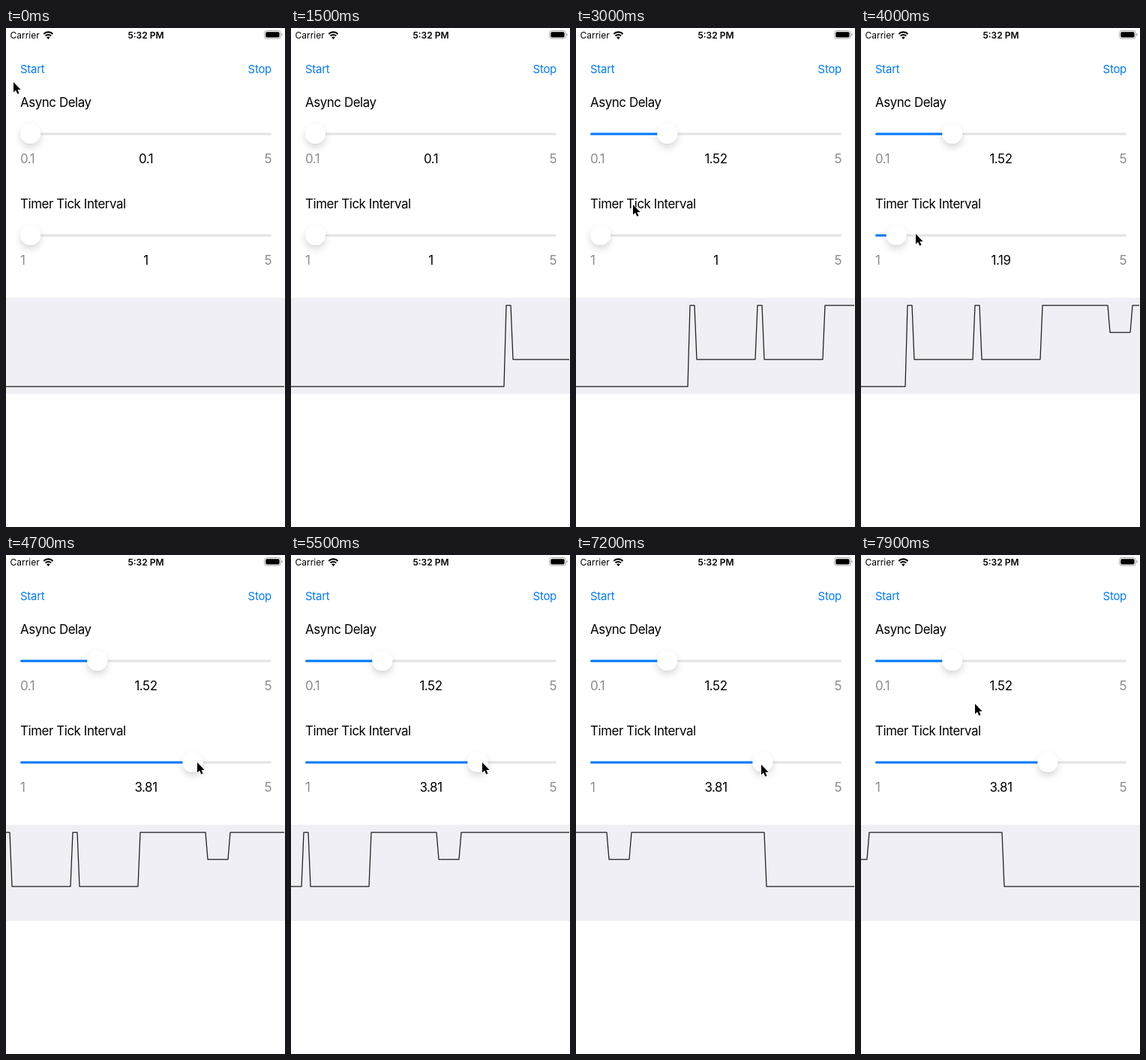
Recreate the animation shown at these times as an HTML page. Size 372 by 664 pixels, loop 8 s.

```html
<!DOCTYPE html>
<html lang="en">
<head>
<meta charset="utf-8">
<title>Async timer demo</title>
<style>
  html, body { margin: 0; width: 100%; height: 100%; overflow: hidden; background: #fff; }
  svg { display: block; width: 372px; height: 664px; font-family: Inter, "Liberation Sans", sans-serif; }
  .status { font-size: 12px; }
  .label { font-size: 16.9px; letter-spacing: -.42px; }
  .button { font-size: 14.9px; letter-spacing: -.22px; fill: #007aff; }
  .limit { fill: #8a8a8e; }
  .mid { text-anchor: middle; }
  .end { text-anchor: end; }
</style>
</head>
<body>
<svg viewBox="0 0 372 664">
  <defs>
    <clipPath id="plot"><rect y="359" width="371" height="128"/></clipPath>
    <filter id="shadow" x="-100%" y="-100%" width="300%" height="300%">
      <feDropShadow dx="0" dy="0.4" stdDeviation="0.5" flood-opacity=".1"/>
      <feDropShadow dx="0" dy="5" stdDeviation="5" flood-opacity=".15"/>
    </filter>
  </defs>

  <text class="status" x="5.5" y="14">Carrier</text>
  <g fill="none" stroke="#000" stroke-width="2.1">
    <path d="M50.3 7.9A8.6 8.6 0 0 1 62.5 7.9"/>
    <path d="M52.6 10.5A5.4 5.4 0 0 1 60.2 10.5"/>
  </g>
  <path d="M56.4 15L54.1 12.6A3.2 3.2 0 0 1 58.7 12.6Z"/>
  <text class="status mid" x="186.5" y="14" font-weight="600">5:32 PM</text>
  <rect x="344.6" y="3.6" width="21.6" height="10.4" rx="3" fill="none" stroke="#a6a6a6"/>
  <rect x="346.2" y="5.2" width="18.4" height="7.2" rx="1.7"/>
  <path d="M367.4 7.1Q368.9 7.5 368.9 8.8T367.4 10.5Z" fill="#a6a6a6"/>

  <text class="button" id="start" x="19" y="60">Start</text>
  <text class="button end" x="354" y="60">Stop</text>

  <g id="sliders"></g>

  <rect y="359" width="372" height="128" fill="#f0eff5"/>
  <g clip-path="url(#plot)">
    <polyline id="signal" fill="none" stroke="#1c1c1e" stroke-width="1.25" stroke-linejoin="round"/>
  </g>
  <path id="cursor" d="M0 0V13.6L3.1 10.8L5.3 15.7L7.5 14.7L5.4 10H9.6Z" stroke="#fff" stroke-width="1.3" paint-order="stroke"/>
</svg>
<script>
const LOOP = 8000, STEP = 100, SCROLL = 0.09;
const TRACK = { left: 19, right: 354, min: 32.5, span: 308 };
const LOW = 477, IDLE = 441, PENDING = 405, HIGH = 369, EDGE = 3;
const byId = id => document.getElementById(id);

// Each key is [time, ...values].
const cursorKeys = [
  [0, 10, 72], [400, 27, 51], [1700, 27, 51], [1800, 9, 138], [2000, 38, 141],
  [2100, 45, 141], [2500, 127, 141], [2700, 127, 142], [3000, 76, 235],
  [3400, 38.5, 276], [3800, 38.5, 275], [3900, 53, 274], [4000, 73, 274],
  [4400, 255, 276], [5500, 255, 276], [5800, 247, 279], [7200, 247, 279], [7800, 152, 198]
];
const delayKeys = [[2100, .1], [2600, 1.52]];
const intervalKeys = [[3800, 1], [4000, 1.19], [4100, 1.45], [4500, 3.81]];

// Level changes, by distance along the scrolling trace.
const levels = [
  [419, HIGH], [428, IDLE], [509, HIGH], [518, IDLE], [599, HIGH],
  [689, PENDING], [719, HIGH], [899, IDLE]
];

function sample(keys, t) {
  if (t <= keys[0][0]) return keys[0].slice(1);
  const i = keys.findIndex(k => k[0] > t);
  if (i < 0) return keys[keys.length - 1].slice(1);
  const a = keys[i - 1], b = keys[i], p = (t - a[0]) / (b[0] - a[0]);
  return a.slice(1).map((v, n) => v + (b[n + 1] - v) * p);
}

function makeSlider(title, y, min, max, keys) {
  const group = document.createElementNS("http://www.w3.org/2000/svg", "g");
  const line = color => `<path d="M20.5 ${y}H352.5" stroke="${color}" stroke-width="3" stroke-linecap="round"/>`;
  group.innerHTML = `
    <text class="label" x="19" y="${y - 36}">${title}</text>
    ${line("#e3e3e5")}${line("#007aff")}
    <circle cy="${y - .5}" r="13.5" fill="#fff" filter="url(#shadow)"/>
    <text class="label limit" x="19" y="${y + 39}">${min}</text>
    <text class="label mid" x="186.5" y="${y + 39}"></text>
    <text class="label limit end" x="354" y="${y + 39}">${max}</text>`;
  byId("sliders").append(group);
  const fill = group.querySelectorAll("path")[1];
  const thumb = group.querySelector("circle");
  const readout = group.querySelector(".mid");
  return t => {
    const [value] = sample(keys, t);
    const x = TRACK.min + (value - min) / (max - min) * TRACK.span;
    fill.setAttribute("d", `M20.5 ${y}H${x}`);
    thumb.setAttribute("cx", x);
    readout.textContent = +value.toFixed(2);
  };
}

const sliders = [
  makeSlider("Async Delay", 141, .1, 5, delayKeys),
  makeSlider("Timer Tick Interval", 276, 1, 5, intervalKeys)
];

function tracePoints() {
  let level = LOW;
  const points = [[-10, level]];
  for (const [x, next] of levels) {
    points.push([x, level], [x + EDGE, next]);
    level = next;
  }
  points.push([1200, level]);
  return points.join(" ");
}
byId("signal").setAttribute("points", tracePoints());

function render(time) {
  const t = Math.floor((time % LOOP) / STEP) * STEP;
  sliders.forEach(update => update(t));
  byId("signal").setAttribute("transform", `translate(${-SCROLL * t} 0)`);
  byId("start").setAttribute("opacity", t >= 400 && t < 600 ? .25 : 1);
  const [x, y] = sample(cursorKeys, t);
  byId("cursor").setAttribute("transform", `translate(${x} ${y})`);
  byId("cursor").setAttribute("visibility", t >= 1100 && t < 1800 ? "hidden" : "visible");
}

const began = performance.now();
function tick() {
  render(performance.now() - began);
  requestAnimationFrame(tick);
}
tick();
</script>
</body>
</html>
```
